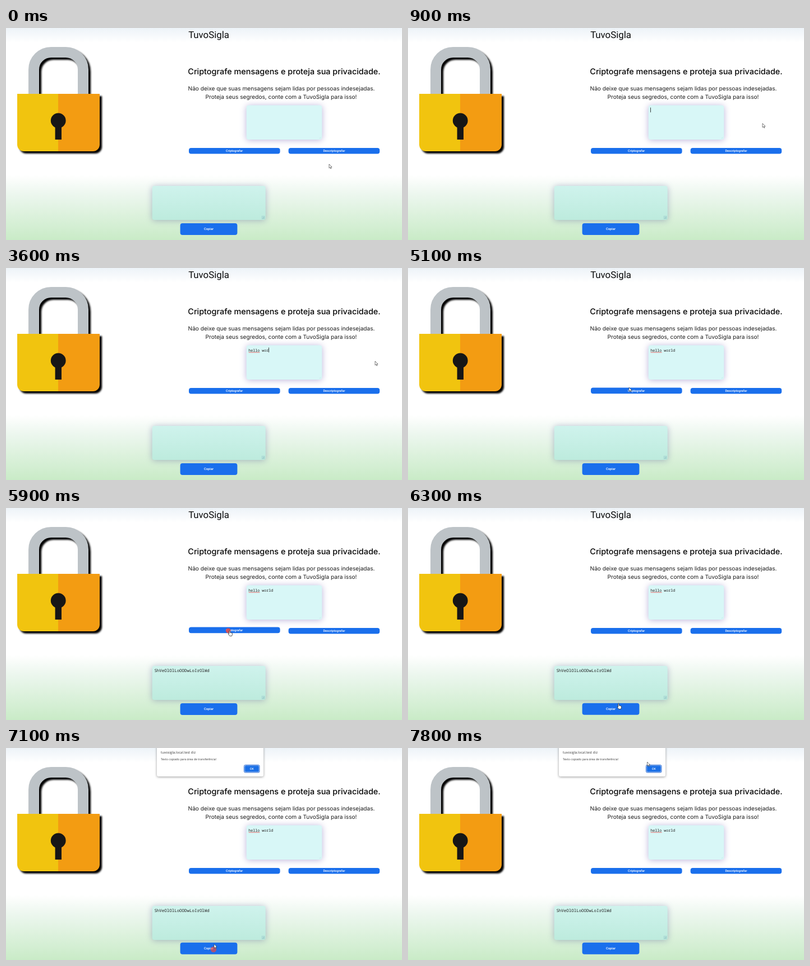
These frames come from a looping animation (706x380 px, 8 s). An HTML page:

```html
<!DOCTYPE html>
<html lang="pt">
<head>
<meta charset="utf-8">
<title>Cifra de mensagens</title>
<style>
  html, body { margin: 0; width: 100%; height: 100%; overflow: hidden; background: #fff; }
  svg { display: block; width: 100%; height: 100%; }
  text { text-rendering: geometricPrecision; white-space: pre; }
  .mid { text-anchor: middle; }
  .title { font: 400 16.8px Roboto, sans-serif; fill: #0a0a0a; }
  .head { font: 500 14.4px Inter, sans-serif; fill: #050505; }
  .sub { font: 400 10.13px Inter, sans-serif; fill: #1c1c1c; }
  .btn rect { fill: #1a6fec; }
  .btn text { font: 500 5.6px Roboto, sans-serif; fill: #fff; }
  .mono { font-family: "Noto Sans Mono", monospace; fill: #222; }
  .dialog text { font-family: "Open Sans", sans-serif; fill: #333; }
  .lock { filter: drop-shadow(4px 4px 1.5px #000); }
  .in { filter: drop-shadow(0 1px 6px rgba(85, 65, 165, .4)); }
  .out { filter: drop-shadow(0 1px 6px rgba(70, 80, 140, .38)); }
  .dialog { filter: drop-shadow(0 1px 2px rgba(0, 0, 0, .4)); }
</style>
</head>
<body>
<svg viewBox="0 0 706 380" preserveAspectRatio="none">
  <defs>
    <linearGradient id="sky" x2="0" y2="1">
      <stop stop-color="#edf3f8"/><stop offset="1" stop-color="#fff"/>
    </linearGradient>
    <linearGradient id="grass" x2="0" y2="1">
      <stop stop-color="#fff"/><stop offset=".28" stop-color="#edf7ef"/><stop offset="1" stop-color="#c9ebc7"/>
    </linearGradient>
    <linearGradient id="mint" x2="0" y2="1">
      <stop stop-color="#cff3ed"/><stop offset="1" stop-color="#bdebdd"/>
    </linearGradient>
  </defs>

  <rect width="706" height="380" fill="#fff"/>
  <rect width="706" height="26" fill="url(#sky)"/>
  <rect y="264" width="706" height="116" fill="url(#grass)"/>

  <g class="lock">
    <path d="M49.5 119V74.5a31 31 0 0 1 31-31h26a31 31 0 0 1 31 31V119" fill="none" stroke="#bdc3c7" stroke-width="19"/>
    <path d="M20 118H93.3V221H32a12 12 0 0 1-12-12Z" fill="#f1c40f"/>
    <path d="M93 118H167V209a12 12 0 0 1-12 12H93Z" fill="#f39c12"/>
  </g>
  <g fill="#161616">
    <circle cx="93.2" cy="166" r="13.4"/>
    <rect x="87.6" y="173" width="11.4" height="27"/>
  </g>

  <text class="title mid" x="361.5" y="18">TuvoSigla</text>
  <text class="head mid" x="496" y="83.4">Criptografe mensagens e proteja sua privacidade.</text>
  <text class="sub mid" x="491" y="112.4">Não deixe que suas mensagens sejam lidas por pessoas indesejadas.</text>
  <text class="sub mid" x="490.5" y="127">Proteja seus segredos, conte com a TuvoSigla para isso!</text>

  <rect class="in" x="428.7" y="138.5" width="134.6" height="61.5" rx="4" fill="#d8f7f7"/>
  <path d="M558.5 198.3l3-3M560.5 198.3l1-1" stroke="#b9dcdf" stroke-width=".5"/>
  <text class="mono" id="typed" x="432.3" y="149.6" font-size="6.67"></text>
  <path id="spell" d="M432.5 151.3h20" stroke="#e2504c" stroke-width=".8"/>
  <rect id="caret" y="142.6" width=".8" height="8.6" fill="#111"/>

  <rect class="out" x="260.7" y="283" width="202" height="61" rx="4" fill="url(#mint)"/>
  <rect x="455.5" y="336.5" width="6" height="6.3" fill="#a9d9d4" opacity=".75"/>
  <path d="M457 342l4-4M459.2 342l1.8-1.8" stroke="#83b3b0" stroke-width=".5"/>
  <text class="mono" id="coded" x="264.4" y="294" font-size="7.46">ShVeOlOlLoOODwLoIrOlWd</text>

  <g class="btn" id="encode">
    <rect x="326" y="215" width="162.6" height="10.6" rx="4"/>
    <text class="mid" x="407.2" y="222.3">Criptografar</text>
  </g>
  <g class="btn">
    <rect x="503.6" y="215" width="162.6" height="10.6" rx="4"/>
    <text class="mid" x="585" y="222.3">Descriptografar</text>
  </g>
  <g class="btn" id="copy">
    <rect x="310.6" y="350" width="101.8" height="21" rx="4"/>
    <text class="mid" x="361.5" y="362.4" style="font-size:5.8px">Copiar</text>
  </g>

  <g class="dialog" id="dialog">
    <path d="M269 -4H459V48a3 3 0 0 1-3 3H272a3 3 0 0 1-3-3Z" fill="#fff"/>
    <text x="276" y="9.8" font-size="6.1">tuvosigla.local.test diz</text>
    <text x="276" y="21.6" font-size="5.15">Texto copiado para área de transferência!</text>
    <rect x="424.5" y="30.5" width="27.4" height="13.4" rx="2" fill="#fff" stroke="#1a5fd0" stroke-width="1"/>
    <rect x="425.6" y="31.6" width="25.2" height="11.2" rx="1.5" fill="#1a6fe6"/>
    <text class="mid" x="438.2" y="39.2" font-size="5" font-weight="600" style="fill:#fff">OK</text>
  </g>

  <circle id="click" fill="#f0463c"/>
  <g id="pointer">
    <path id="arrow" d="M0 0V7.2L1.7 5.7 2.8 8.2 4 7.7 2.9 5.2H5.1Z" fill="#fff" stroke="#222" stroke-width=".6" stroke-linejoin="round"/>
    <path id="hand" d="M.6 .7Q1.4 -.4 2.2 .7V4.2Q3 3.7 3.6 4.5Q4.4 4 5 4.9Q6.3 4.6 6.4 6V8L5.6 10.4H1.8L-.8 6.9Q-1 5.6 .6 6.5Z" fill="#fff" stroke="#151515" stroke-width=".7" stroke-linejoin="round"/>
  </g>
</svg>
<script>
const $ = id => document.getElementById(id);
const LOOP = 8000, STEP = 100;
const message = "hello world";
const keyTimes = [1700, 1900, 2100, 2300, 2400, 2700, 3400, 3500, 3600, 3800, 4150];

// time, x, y of the pointer tip
const path = [
  [100, 576, 244], [400, 545, 192], [500, 536, 180], [700, 540, 178],
  [900, 632, 171], [1100, 658, 167], [4100, 658, 167], [4400, 661, 168],
  [4600, 640, 190], [4800, 548, 222], [4950, 460, 229], [5100, 394, 214],
  [5400, 397, 219], [6000, 397, 219], [6150, 386, 275], [6300, 374, 350],
  [6500, 370, 361], [7000, 370, 361], [7200, 372, 342], [7400, 395, 205],
  [7600, 418, 80], [7800, 426.5, 25]
];
// time, x, y of each press
const clicks = [[500, 536, 180], [5800, 396.2, 219.8], [6900, 370, 361]];

const between = (t, a, b) => t >= a && t < b;
const ramp = (t, a, b) => Math.min(1, Math.max(0, (t - a) / (b - a)));
const show = (id, on) => $(id).setAttribute("visibility", on ? "visible" : "hidden");
const move = (id, x, y) => $(id).setAttribute("transform", `translate(${x} ${y})`);

function pointerAt(t) {
  const i = path.findIndex(p => p[0] > t);
  if (i === 0) return path[0].slice(1);
  if (i < 0) return path[path.length - 1].slice(1);
  const [t0, x0, y0] = path[i - 1], [t1, x1, y1] = path[i];
  const k = ramp(t, t0, t1);
  return [x0 + (x1 - x0) * k, y0 + (y1 - y0) * k];
}

function drawText(t) {
  const count = keyTimes.filter(k => k <= t).length;
  const lastKey = count ? keyTimes[count - 1] : 600;
  const blinkOn = Math.floor((t - lastKey) / 500) % 2 === 0;
  $("typed").textContent = message.slice(0, count);
  $("caret").setAttribute("x", 432 + count * 4);
  show("caret", between(t, 600, 5700) && blinkOn);
  show("spell", t >= 2700);
  show("coded", t >= 5900);
}

function drawClick(t) {
  const hit = clicks.find(c => between(t, c[0], c[0] + 300));
  show("click", hit);
  if (!hit) return;
  const age = (t - hit[0]) / 300;
  const c = $("click");
  c.setAttribute("cx", hit[1]);
  c.setAttribute("cy", hit[2]);
  c.setAttribute("r", 3.6 + 2.4 * age);
  c.setAttribute("opacity", 1 - 0.5 * age);
}

function draw(t) {
  drawText(t);
  drawClick(t);
  move("encode", 0, -1.4 * (ramp(t, 5050, 5200) - ramp(t, 6050, 6250)));
  move("copy", 0, -1.3 * ramp(t, 6250, 6450));
  show("dialog", t >= 7100);
  const overButton = between(t, 5200, 6100) || between(t, 6300, 7100);
  show("hand", overButton);
  show("arrow", !overButton);
  move("pointer", ...pointerAt(t));
}

function tick() {
  const t = performance.now() % LOOP;
  draw(Math.floor(t / STEP) * STEP);
  requestAnimationFrame(tick);
}
tick();
</script>
</body>
</html>
```
